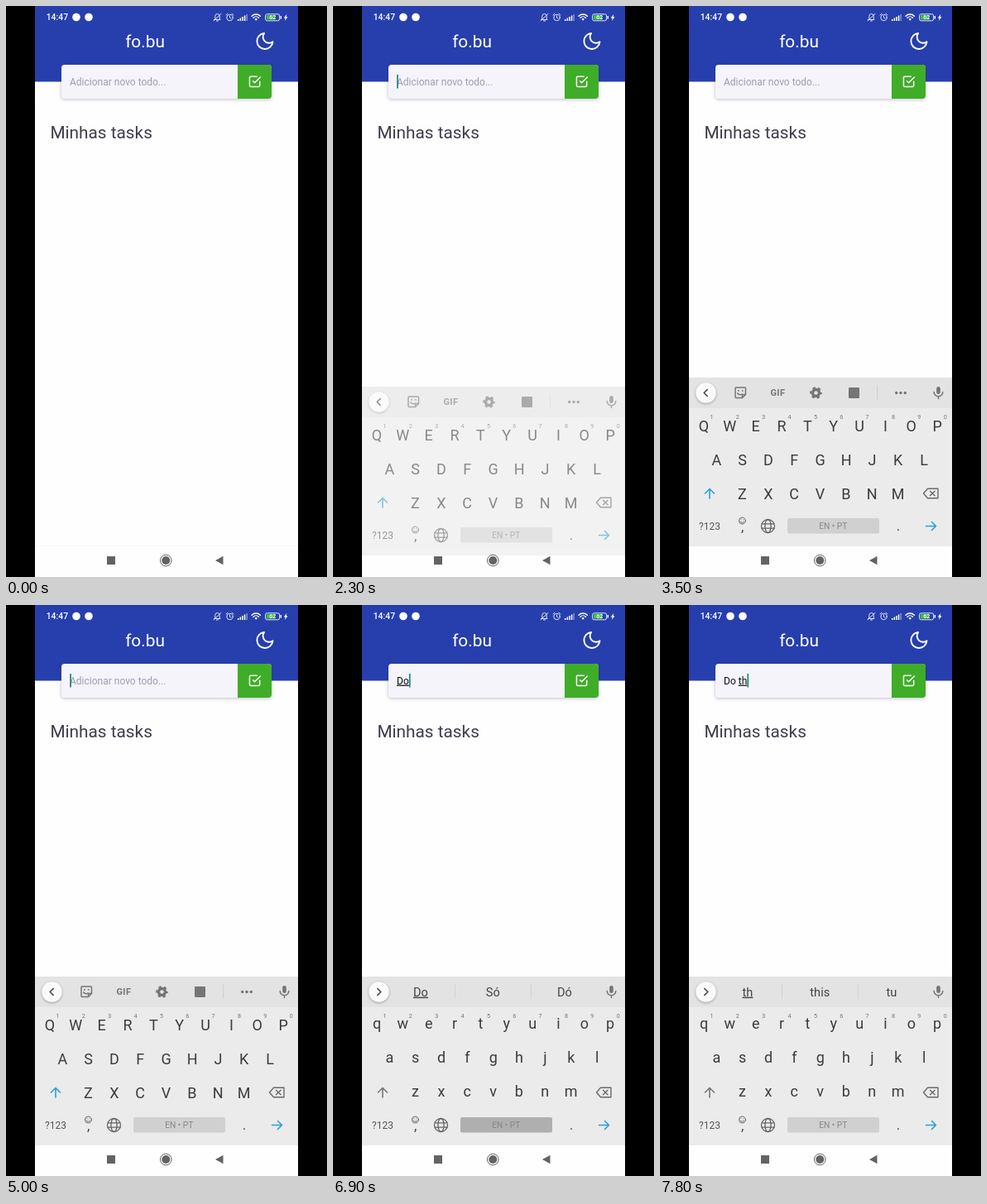
These frames come from a looping animation (388 by 690 pixels, 8 s). An HTML page:

```html
<!DOCTYPE html>
<html lang="pt">
<head>
<meta charset="utf-8">
<title>Tasks</title>
<style>
  html, body { margin: 0; width: 100%; height: 100%; overflow: hidden; background: #000; }
  svg { display: block; width: 388px; height: 690px; font-family: Roboto, sans-serif; }
  text { white-space: pre; }
  .mid { text-anchor: middle; }
  .line { fill: none; stroke-linecap: round; stroke-linejoin: round; }
  .field { filter: drop-shadow(0 1px 2px rgba(40, 40, 80, .3)); }
  .lift { filter: drop-shadow(0 1px 1.5px rgba(0, 0, 0, .3)); }
  .under { text-decoration: underline; }
</style>
</head>
<body>
<svg viewBox="0 0 388 690" xmlns="http://www.w3.org/2000/svg">
  <rect width="388" height="690"/>
  <rect x="35" width="318" height="690" fill="#fefefe"/>
  <rect x="35" width="318" height="91.5" fill="#273fad"/>

  <!-- status bar -->
  <g fill="#fff">
    <text x="48.7" y="17.4" font-size="10.4" font-weight="500">14:47</text>
    <circle cx="85" cy="13.5" r="4.8"/>
    <circle cx="100" cy="13.5" r="4.8"/>
    <g class="line" stroke="#dfe3f6" stroke-width="1">
      <path d="M251.5 16.5h7.5M252.8 16v-3.5a2.7 3 0 0 1 5.4 0V16M254.5 18h2M251 17.8l9-8.3"/>
      <circle cx="270.5" cy="14" r="3.7"/>
      <path d="M270.5 12v2.2l1.5 1M266 11l2-1.8M275 11l-2-1.8"/>
      <path d="M297 12.2a7.4 7.4 0 0 1 10.4 0M298.9 14.2a4.7 4.7 0 0 1 6.6 0" stroke="#fff" stroke-width="1.4"/>
    </g>
    <path d="M300.4 15.8a2.6 2.6 0 0 1 3.6 0l-1.8 2z"/>
    <path d="M280 18v-2h1.5v2zm2.6 0v-3.5h1.5V18zm2.6 0v-5h1.5v5zm2.6 0v-6.5h1.5V18z"/>
    <path d="M290.4 18v-8h1.5v8z" opacity=".45"/>
    <rect x="313.6" y="9.8" width="17" height="8" rx="2" fill="#273fad" stroke="#e6eaf8"/>
    <rect x="314.8" y="11" width="10.8" height="5.6" rx="1" fill="#3cc13f"/>
    <rect x="331.6" y="12" width="1.4" height="3.6"/>
    <text class="mid" x="322.2" y="16.4" font-size="7" font-weight="500">62</text>
    <path d="M339.4 9.8l-3.6 4.6h2l-1 3.6 3.8-4.8h-2z"/>
  </g>

  <!-- header and form -->
  <text class="mid" x="168" y="50.3" font-size="20.8" fill="#fff">fo.bu</text>
  <path class="line" transform="translate(300.2 29.8) scale(1.06)" stroke="#fff" stroke-width="1.8"
    d="M21 12.79A9 9 0 1 1 11.21 3 7 7 0 0 0 21 12.79z"/>
  <g class="field">
    <rect x="67" y="71" width="254" height="41" rx="4" fill="#f4f4fa"/>
    <path d="M280 71h37a4 4 0 0 1 4 4v33a4 4 0 0 1-4 4h-37z" fill="#3fad27"/>
  </g>
  <path class="line" transform="translate(292.4 83.2) scale(.68)" stroke="#fff" stroke-width="2.2"
    d="M9 11l3 3L22 4M21 12v7a2 2 0 0 1-2 2H5a2 2 0 0 1-2-2V5a2 2 0 0 1 2-2h11"/>
  <text id="hint" x="77" y="95.7" font-size="12" fill="#a09cb1">Adicionar novo todo...</text>
  <text x="77" y="95.7" font-size="12" fill="#111"><tspan id="done"></tspan><tspan id="word" class="under"></tspan></text>
  <rect id="caret" y="83" width="1.7" height="16.5" fill="#17897c"/>
  <text x="53.4" y="160" font-size="20.8" fill="#3d3d4d">Minhas tasks</text>
  <path d="M35 652.5h318" stroke="#f6f6f6"/>

  <!-- keyboard -->
  <g id="board">
    <rect x="35" y="449" width="318" height="204" fill="#ebebeb"/>
    <rect x="35" y="449" width="318" height="37" fill="#e3e3e3"/>
    <rect x="35" y="653" width="318" height="37" fill="#fefefe"/>
    <circle class="lift" cx="55.5" cy="467.5" r="12.2" fill="#fafafa"/>
    <path id="chevron" class="line" stroke="#444" stroke-width="1.6"/>
    <g fill="#757575">
      <rect x="334.2" y="460" width="4.6" height="9" rx="2.3"/>
      <path class="line" d="M331.2 466.5a5.3 5.3 0 0 0 10.6 0M336.5 472v2.5" stroke="#757575" stroke-width="1.5"/>
    </g>
    <g id="tools" fill="#757575">
      <g class="line" stroke="#757575" stroke-width="1.5">
        <path d="M92 461h10.500q1 0 1 1v7.500l-4 4H92q-1 0-1-1V462q0-1 1-1zM99.500 473v-3.500h4M93.800 468a3.400 3.400 0 0 0 5 1"/>
        <path d="M94.800 464.800h.2M99.600 464.800h.2" stroke-width="1.800"/>
      </g>
      <text class="mid" x="142.500" y="471.200" font-size="11" font-weight="700" letter-spacing=".5">GIF</text>
      <circle cx="188.500" cy="467.500" r="4" fill="none" stroke="#757575" stroke-width="3.400"/>
      <circle cx="188.500" cy="467.500" r="6.200" fill="none" stroke="#757575" stroke-width="2.200" stroke-dasharray="3.250" stroke-dashoffset="1.600"/>
      <rect x="228" y="461" width="13" height="13" rx="1"/>
      <path d="M262.500 458.500v17" stroke="#cfcfcf"/>
      <circle cx="285.700" cy="467.500" r="1.700"/><circle cx="291" cy="467.500" r="1.700"/><circle cx="296.300" cy="467.500" r="1.700"/>
    </g>
    <g id="tips" class="mid" font-size="14.600" fill="#444">
      <path d="M147.500 458v18M239.500 458v18" stroke="#d2d2d2"/>
      <text x="106" y="472.700"></text><text x="193.300" y="472.700"></text><text x="280" y="472.700"></text>
    </g>
    <g id="keys" class="mid" font-size="18" fill="#3c3c3c"></g>
    <g id="digits" class="mid" font-size="7.200" fill="#757575"></g>
    <path id="shift" class="line" d="M60 595v-11.500M54.500 589l5.500-5.500 5.500 5.500" stroke-width="1.600"/>
    <path class="line" d="M323.500 583.200H336v11.600h-12.500l-5-5.800zM326.500 586.200l5.600 5.600M332.100 586.200l-5.600 5.600" stroke="#6a6a6a" stroke-width="1.400"/>
    <text class="mid" x="60" y="632.800" font-size="12" fill="#555">?123</text>
    <g class="line" stroke="#666" stroke-width="1">
      <circle cx="99.500" cy="622" r="4"/>
      <path d="M97.400 623a2.300 2.300 0 0 0 4.200 0M98 620.700h.1M101 620.700h.1"/>
      <g stroke-width="1.300">
        <circle cx="130.500" cy="628.500" r="8"/>
        <ellipse cx="130.500" cy="628.500" rx="3.600" ry="8"/>
        <path d="M123 625.800h15M123 631.200h15"/>
      </g>
    </g>
    <text class="mid" x="99.800" y="635" font-size="17" fill="#444">,</text>
    <rect id="space" x="154" y="619" width="111" height="18.500" rx="2"/>
    <text class="mid" x="209.300" y="632" font-size="10.200" fill="#888">EN • PT</text>
    <text class="mid" x="288" y="634" font-size="17" fill="#444">.</text>
    <path class="line" d="M321.500 628.500h12M328.500 623.500l5 5-5 5" stroke="#2a9fdc" stroke-width="1.600"/>
    <g id="popup">
      <rect class="lift" x="-15.500" y="-74" width="31" height="90.500" rx="4" fill="#fff"/>
      <text class="mid" y="-44" font-size="21" fill="#3c3c3c"></text>
    </g>
  </g>

  <!-- navigation bar -->
  <g fill="#636363">
    <rect x="122" y="665" width="10" height="10"/>
    <circle cx="193.300" cy="670" r="5"/>
    <circle cx="193.300" cy="670" r="6.800" fill="none" stroke="#636363"/>
    <path d="M253 670l9.500-5.200v10.400z"/>
  </g>
</svg>
<script>
const $ = id => document.getElementById(id);
const LOOP = 8000, TICK = 100;
const KEYS = [];

function addText(parent, x, y, str) {
  const el = document.createElementNS('http://www.w3.org/2000/svg', 'text');
  el.setAttribute('x', x);
  el.setAttribute('y', y);
  el.textContent = str;
  return parent.appendChild(el);
}

[['QWERTYUIOP', 53], ['ASDFGHJKL', 68.3], ['ZXCVBNM', 99.5]].forEach(([row, x0], r) => {
  [...row].forEach((ch, i) => {
    const x = x0 + 31.35 * i, y = 507.3 + 41 * r;
    KEYS.push({ ch, x, y, el: addText($('keys'), x, y, ch) });
    if (!r) addText($('digits'), x + 9.5, 498.8, (i + 1) % 10);
  });
});

// start time, finished text, word being typed, suggestions, popup key, space held
const STEPS = [
  [0, '', '', ''],
  [6500, '', '', '', 'D'],
  [6600, '', 'D', 'D De Da'],
  [6700, '', 'D', 'D De Da', 'o'],
  [6800, '', 'Do', 'Do Só Dó'],
  [6900, '', 'Do', 'Do Só Dó', '', true],
  [7000, 'Do\u00a0', '', 'que dia meu'],
  [7300, 'Do\u00a0', '', 'que dia meu', 't'],
  [7400, 'Do\u00a0', 't', 't te tu'],
  [7600, 'Do\u00a0', 't', 't te tu', 'h'],
  [7700, 'Do\u00a0', 'th', 'th this tu', 'h'],
  [7800, 'Do\u00a0', 'th', 'th this tu']
];

// keyboard entrance: time, drop, opacity
const ENTER = [[0, 0, 0], [2300, 11, .6], [2400, 2.6, 1], [2500, 0, 1]];

const at = (table, t) => table.filter(s => s[0] <= t).pop();
const show = (el, on) => el.setAttribute('visibility', on ? 'visible' : 'hidden');

function drawKeys(lower) {
  for (const k of KEYS) {
    k.el.textContent = lower ? k.ch.toLowerCase() : k.ch;
    k.el.setAttribute('y', k.y + (lower ? 5 : 6.4));
  }
  $('shift').setAttribute('stroke', lower ? '#777' : '#2a9fdc');
  $('chevron').setAttribute('d', lower ? 'M53.8 463.500l4 4-4 4' : 'M57.200 463.500l-4 4 4 4');
}

function draw(t) {
  const [, drop, alpha] = at(ENTER, t);
  $('board').setAttribute('transform', `translate(0 ${drop})`);
  $('board').setAttribute('opacity', alpha);

  const [, done, word, tips, key, held] = at(STEPS, t);
  const typing = done + word !== '';
  $('done').textContent = done;
  $('word').textContent = word;
  show($('hint'), !typing);
  show($('tools'), !typing);
  show($('tips'), typing);
  drawKeys(typing);

  const words = tips.split(' ');
  $('tips').querySelectorAll('text').forEach((el, i) => {
    el.textContent = words[i] || '';
    el.classList.toggle('under', i === 0 && word !== '');
  });

  const width = typing ? $('word').parentNode.getComputedTextLength() : 0;
  $('caret').setAttribute('x', 77.2 + width);
  show($('caret'), typing || (t >= 2000 && Math.floor(t / 500) % 2 === 0));

  $('space').setAttribute('fill', held ? '#afafaf' : '#d0d0d0');
  show($('popup'), !!key);
  if (key) {
    const { x, y } = KEYS.find(k => k.ch === key.toUpperCase());
    $('popup').setAttribute('transform', `translate(${x} ${y})`);
    $('popup').querySelector('text').textContent = key;
  }
}

const start = performance.now();
let last = -1;
function frame() {
  const t = Math.floor((performance.now() - start) % LOOP / TICK) * TICK;
  if (t !== last) draw(last = t);
  requestAnimationFrame(frame);
}
frame();
</script>
</body>
</html>
```
